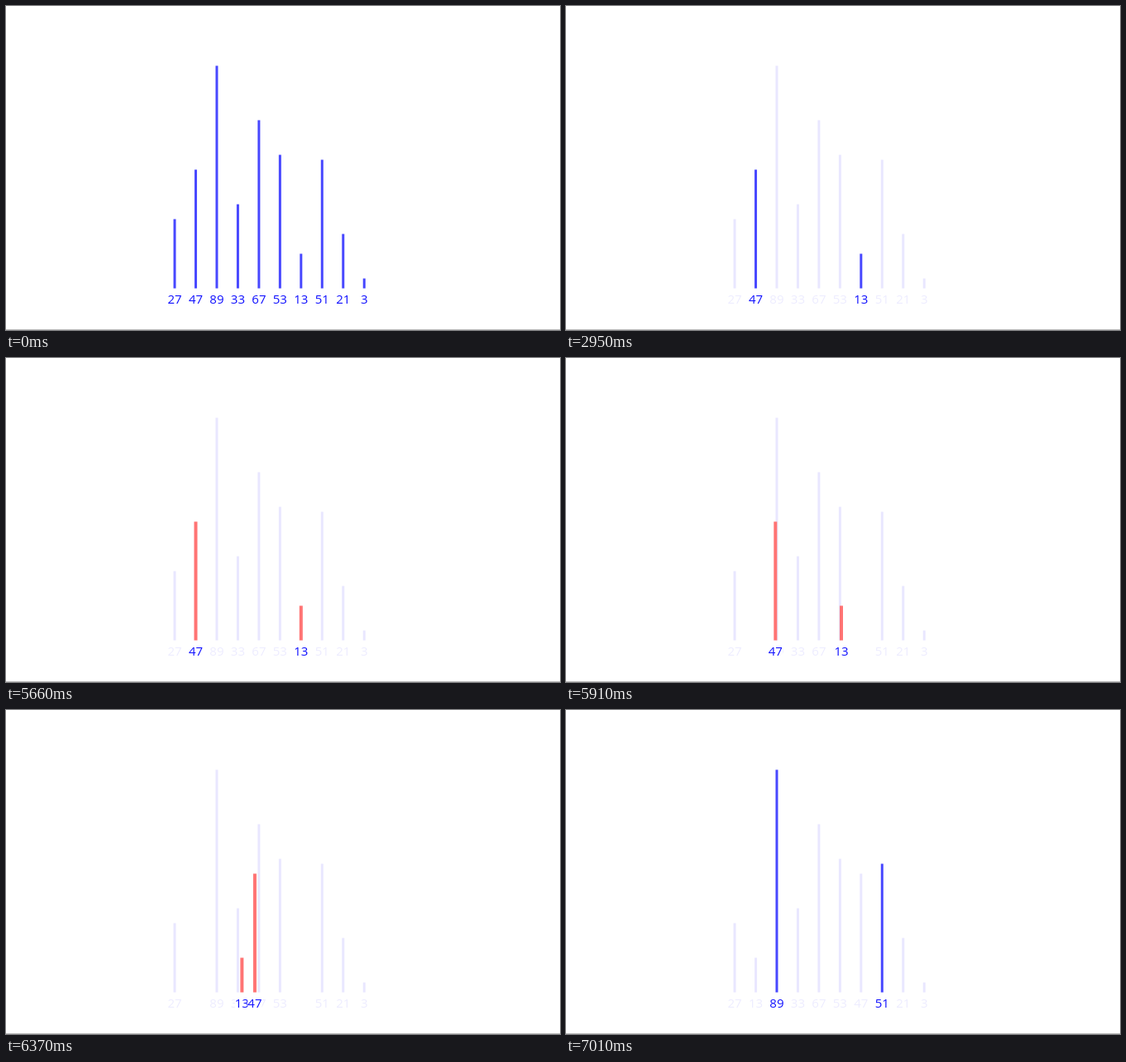
An HTML page with a canvas that plays this animation: 670 by 393 pixels, repeating every 8000 ms.

```html
<!DOCTYPE html>
<html lang="en">
<head>
<meta charset="utf-8">
<title>Shell sort</title>
<style>
  html, body { margin: 0; height: 100%; overflow: hidden; background: #fff; }
  canvas { display: block; }
</style>
</head>
<body>
<canvas id="stage" width="670" height="393"></canvas>
<script>
const ctx = document.getElementById('stage').getContext('2d');
const LOOP = 8000;
const BLUE = '#4848ff', RED = '#ff4848', FADED = '#e9e7ff', MOVING = '#ff7474';
const START = [27, 47, 89, 33, 67, 53, 13, 51, 21, 3];
const SWAPPED = [27, 13, 89, 33, 67, 53, 47, 51, 21, 3];
const STEP = 7.94;

// Start time, compared pair and its bar colour
const PHASES = [
  [240, [0, 5], BLUE],
  [1560, [0, 5], RED],
  [2950, [1, 6], BLUE],
  [4340, [1, 6], RED],
  [5660, [1, 6], MOVING],
  [7010, [2, 7], BLUE]
];

const slotX = i => 204 + 25.47 * i;

function drawBar(x, value, color, width = 3) {
  ctx.fillStyle = color;
  ctx.fillRect(x - width / 2, 339.5 - 3 * value, width, 3 + 3 * value);
}

function drawLabel(x, value, color) {
  const width = ctx.measureText(value).width;
  ctx.fillStyle = '#fff';
  ctx.fillRect(x - width / 2, 346, width, 18);
  ctx.fillStyle = color;
  ctx.fillText(value, x, 361);
}

function swapStep(t) {
  return t < 6470
    ? Math.min(9, Math.floor((t - 5660) / 78.8))
    : 10 + Math.floor((t - 6470) / 77);
}

function draw(t) {
  const [, pair, color] = PHASES.findLast(p => t >= p[0]) || [0, null, BLUE];
  const values = t < 7010 ? START : SWAPPED;
  const moving = color === MOVING;
  const shift = moving ? STEP * Math.min(16, swapStep(t)) : 0;

  ctx.fillStyle = '#fff';
  ctx.fillRect(0, 0, 670, 393);
  ctx.fillStyle = '#bdbdbd';
  ctx.fillRect(0, 392, 670, 1);
  ctx.font = '15px "Open Sans", "Noto Sans", sans-serif';
  ctx.textAlign = 'center';

  const active = i => !pair || pair.includes(i);
  values.forEach((value, i) => {
    if (active(i)) return;
    drawBar(slotX(i), value, FADED);
    drawLabel(slotX(i), value, '#edecff');
  });
  for (let i = values.length - 1; i >= 0; i--) {
    if (!active(i)) continue;
    const x = slotX(i) + (pair && i === pair[0] ? shift : -shift);
    drawBar(x, values[i], color, moving ? 4 : 3);
    drawLabel(x, values[i], '#1010ff');
  }
}

function tick() {
  draw(performance.now() % LOOP);
  requestAnimationFrame(tick);
}
tick();
</script>
</body>
</html>
```
